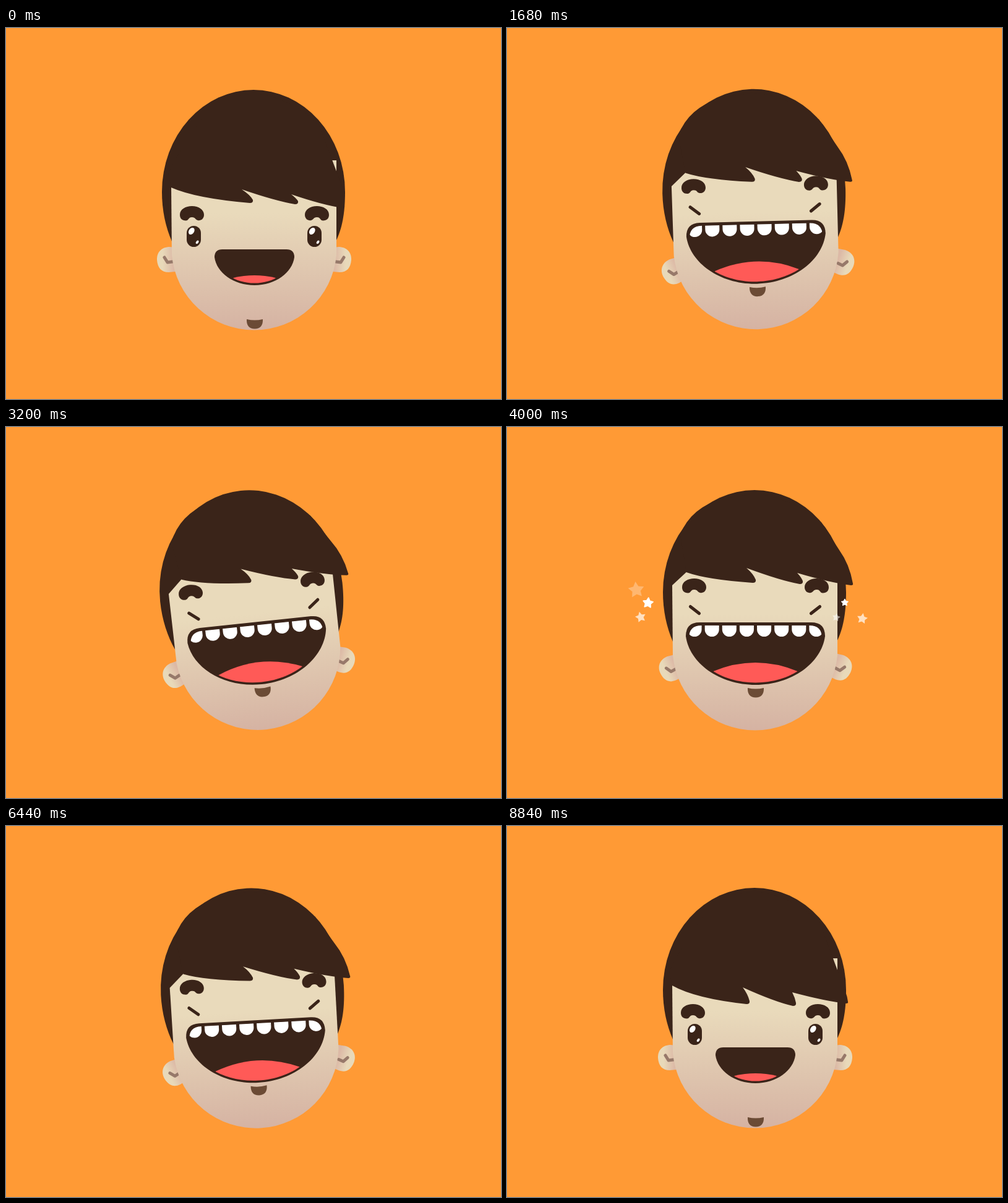
An HTML page with a canvas that plays this animation: 800 by 600 pixels, repeating every 8.88 s.

```html
<!DOCTYPE html>
<html lang="en">
<head>
<meta charset="utf-8">
<title>Laughing head</title>
<style>
html, body { margin: 0; width: 100%; height: 100%; overflow: hidden; background: #ff9a35; }
canvas { display: block; }
</style>
</head>
<body>
<canvas id="stage" width="800" height="600"></canvas>
<script>
const ctx = document.getElementById('stage').getContext('2d');
const LOOP = 8880, STEP = 40, CX = 401, DARK = '#3a2419';

// browY, browX, eyeY, eyeH, eyeAngle, mouthW, mouthTop, mouthBottom,
// tongueW, tongueSide, tongueTop, chinY, earX, earY, earAngle
const REST  = [0, 0, 337, 34, 0, 64.5, 358, 416, 34, 12, 20, 0, 0, 0, 0];
const OPEN  = [-37, 0, 302.5, 5, 0, 109.5, 321, 419, 66, 20, 47, -38, 0, 10.5, -20];
const LAUGH = [-45, 2, 294, 5, 38, 112.5, 314, 415, 68, 22, 50, -51, 2, 14, -22];

// fringe corners: left, tip, notch, tip, notch, tip, then right side, shoulder, bulge, temple
const HAIR_REST  = [267,258, 399,283, 381,261, 472,285, 461,269, 547,291, 547,266, 505,155, 305,150, 262,235];
const HAIR_DROP  = [267,258, 392,288, 381,261, 467,291, 461,269, 551,287, 547,268, 505,155, 305,150, 262,235];
const HAIR_UP    = [285,237, 398,257, 383,231, 474,257, 464,237, 551,263, 545,232, 505,152, 305,150, 262,225];
const HAIR_LAUGH = [290,233, 402,250, 387,226, 478,252, 469,234, 559,254, 537,197, 508,152, 297,128, 280,172];

const POSE = [[0, REST], [680, OPEN], [1000, LAUGH], [6700, LAUGH], [7050, OPEN], [7700, REST]];
const HAIR = [[0, HAIR_REST], [680, HAIR_UP], [1000, HAIR_LAUGH], [6700, HAIR_LAUGH], [7050, HAIR_UP],
  [7750, HAIR_DROP], [8250, HAIR_REST], [8840, HAIR_DROP]];
const TILT = [[920, [0]], [1400, [-4]], [2380, [9]], [3200, [-6]], [4000, [0]], [4550, [-3]],
  [5200, [12.8]], [6030, [-7.5]], [6820, [.8]], [7340, [0]]];

// start, duration, x from, x to, y, radius, turn
const STARS = [
  [80, 680, 273, 208, 263.5, 14, -6],
  [350, 650, 262, 217, 284.5, 10, 6],
  [130, 760, 264, 212, 307.5, 9.5, -14],
  [450, 560, 525, 557, 284, 7, 0],
  [130, 760, 527, 578, 310, 9.5, 10],
  [640, 660, 526, 578, 308, 9, 10]
];
const STAR_START = 1760, STAR_CYCLE = 1560, STAR_END = 6440;

const clamp = v => Math.max(0, Math.min(1, v));
const lerp = (a, b, u) => a + (b - a) * u;
const smooth = u => u * u * (3 - 2 * u);
const rad = d => d * Math.PI / 180;

function track(keys, t) {
  if (t <= keys[0][0]) return keys[0][1];
  for (let i = 1; i < keys.length; i++) {
    const [t1, b] = keys[i], [t0, a] = keys[i - 1];
    if (t < t1) {
      const u = smooth((t - t0) / (t1 - t0));
      return a.map((v, k) => lerp(v, b[k], u));
    }
  }
  return keys[keys.length - 1][1];
}

function fill(path, color) {
  ctx.fillStyle = color;
  ctx.fill(path);
}

function at(x, y, angle, draw, flip = 1) {
  ctx.save();
  ctx.translate(x, y);
  ctx.scale(flip, 1);
  ctx.rotate(rad(angle));
  draw();
  ctx.restore();
}

const backHair = new Path2D('M268 345C258 322 252 295 252 265A148 165 0 0 1 548 265C548 300 543 325 533 345Z');
const face = new Path2D('M267 254L310 214H534V367A133.5 133 0 0 1 268 367Z');
const ear = new Path2D('M24 -18L4 -21C-10 -21 -17.5 -12 -17 0C-16 13 -10 20 2 20L24 18Z');
const earLine = new Path2D('M-5 -4L0 4L8 3');
const brow = new Path2D('M-19.5 2C-19.5 -7 -10 -12 0 -12C11 -12 19.5 -6 19.5 2C19.5 9 14 12 9.5 11C5 10 6 6 0 6C-6 6 -5 11.500 -10 11.500C-16 11.500 -19.500 8 -19.500 2Z');
const chin = new Path2D('M389 471Q402 474 415 471C415.500 481 411 486.500 402 486.500C393 486.500 388.500 481 389 471Z');

const skin = ctx.createLinearGradient(0, 300, 0, 500);
skin.addColorStop(0, '#e9dabb');
skin.addColorStop(1, '#d4b0a1');
const earSkin = ctx.createLinearGradient(-8, 0, 10, 0);
earSkin.addColorStop(0, '#e8d9b9');
earSkin.addColorStop(1, '#dcb9a6');

function drawEars(dx, dy, angle) {
  for (const side of [-1, 1]) {
    at(CX + side * (140 - dx), 375 + dy, angle, () => {
      fill(ear, earSkin);
      ctx.strokeStyle = '#97796a';
      ctx.lineWidth = 5;
      ctx.lineCap = ctx.lineJoin = 'round';
      ctx.stroke(earLine);
    }, -side);
  }
}

function drawFringe(h) {
  const p = i => [h[2 * i], h[2 * i + 1]];
  const path = new Path2D();
  const mix = (a, b, u, v) => [lerp(a[0], b[0], u), lerp(a[1], b[1], v)];
  // a lock runs from a to a rounded tip, then back up to b
  const lock = (a, tip, b, u, v, r) => {
    const [x, y] = tip;
    path.quadraticCurveTo(...mix(a, tip, u, v), x - r, y);
    path.quadraticCurveTo(x + 1, y, x, y - r);
    path.quadraticCurveTo(...mix(b, tip, .75, .4), ...b);
  };
  path.moveTo(...p(0));
  lock(p(0), p(1), p(2), .3, .7, 5);
  lock(p(2), p(3), p(4), .6, .78, 5);
  lock(p(4), p(5), p(6), .6, .8, 3);
  path.lineTo(...p(7));
  path.quadraticCurveTo(455, 110, CX, 106);
  path.lineTo(350, 113);
  path.quadraticCurveTo(...p(8), ...p(9));
  path.closePath();
  fill(path, DARK);
}

function drawEyes(y, h, angle) {
  for (const side of [-1, 1]) {
    at(CX + side * 97.5, y, -side * angle, () => {
      const path = new Path2D();
      path.roundRect(-11.5, -h / 2, 23, h, 11.5);
      fill(path, DARK);
      if (h < 9) return;
      ctx.scale(1, h / 34);
      const shine = new Path2D();
      shine.ellipse(-3.7, -8.5, 4.2, 6, rad(35), 0, 7);
      fill(shine, '#fff');
      const dot = new Path2D();
      dot.ellipse(5.6, 9.3, 1.9, 3, rad(35), 0, 7);
      fill(dot, '#fff');
    });
  }
}

function mouthPath(x, w, top, bottom) {
  const h = bottom - top, r = h * .22, y = top + r, k = y + (h - r) * .55;
  const path = new Path2D();
  path.moveTo(x - w + r, top);
  path.lineTo(x + w - r, top);
  path.quadraticCurveTo(x + w, top, x + w, y);
  path.bezierCurveTo(x + w * .95, k, x + w * .52, bottom, x, bottom);
  path.bezierCurveTo(x - w * .52, bottom, x - w * .95, k, x - w, y);
  path.quadraticCurveTo(x - w, top, x - w + r, top);
  return path;
}

function drawMouth(w, top, bottom, tw, side, arch) {
  const x = 401.5, open = clamp((w - 64.5) / 45);
  fill(mouthPath(x, w, top, bottom), DARK);
  ctx.save();
  ctx.clip(mouthPath(x, w - 5, top + 5, bottom - 3.5));
  const tongue = new Path2D();
  tongue.moveTo(x - tw, bottom - side);
  tongue.quadraticCurveTo(x, bottom - arch, x + tw, bottom - side);
  tongue.lineTo(x + tw, bottom);
  tongue.lineTo(x - tw, bottom);
  fill(tongue, '#ff5a57');
  if (open > .05) {
    const gap = w / 4, tooth = 23 * open, tall = 18.5 * open;
    for (let i = 0; i < 8; i++) {
      const path = new Path2D();
      const r = Math.min(tooth / 2, tall);
      path.roundRect(x + (i - 3.5) * gap - tooth / 2, top + 4.5, tooth, tall, [0, 0, r, r]);
      fill(path, '#fff');
    }
  }
  ctx.restore();
}

function drawStar(x, y, r, turn, alpha) {
  at(x, y, turn, () => {
    const path = new Path2D(), size = r * .88;
    for (let i = 0; i < 10; i++) {
      const a = i * Math.PI / 5 - Math.PI / 2, d = i % 2 ? size * .52 : size;
      path.lineTo(Math.cos(a) * d, Math.sin(a) * d);
    }
    path.closePath();
    const grow = new Path2D(path);
    ctx.globalAlpha = alpha;
    ctx.lineJoin = 'round';
    ctx.lineWidth = r * .2;
    ctx.strokeStyle = '#fff';
    // fade fill and outline as one shape
    if (alpha < 1) {
      ctx.lineWidth = 0.01;
      ctx.scale(1.1, 1.1);
    }
    fill(grow, '#fff');
    if (alpha === 1) ctx.stroke(path);
  });
}

function drawStars(t) {
  if (t < STAR_START || t >= STAR_END) return;
  const c = (t - STAR_START) % STAR_CYCLE;
  for (const [start, span, x0, x1, y, r, turn] of STARS) {
    const u = (c - start) / span;
    if (u <= 0 || u >= 1) continue;
    const e = 1 - (1 - u) ** 2;
    const alpha = Math.min(clamp(u / .11), clamp((1 - u) / .4));
    drawStar(lerp(x0, x1, e), y, r * lerp(.75, 1, e), turn, alpha);
  }
}

function tilted(angle, bob, draw) {
  at(CX, 300 + bob, angle, () => {
    ctx.translate(-CX, -300);
    draw();
  });
}

function render(t) {
  const [browY, browX, eyeY, eyeH, eyeA, mw, mt, mb, tw, ts, ta, chinY, earX, earY, earA] = track(POSE, t);
  const tilt = track(TILT, t)[0], lag = track(TILT, t - 120)[0];
  const shake = clamp((t - 920) / 300) * clamp((7340 - t) / 300);
  const bob = 2 * shake * Math.cos(2 * Math.PI * (t - 4000) / 880);

  ctx.fillStyle = '#ff9a35';
  ctx.fillRect(0, 0, 800, 600);
  tilted(lag, bob, () => drawEars(earX, earY, earA));
  tilted(tilt, bob, () => {
    fill(backHair, DARK);
    fill(face, skin);
    drawFringe(track(HAIR, t));
    for (const side of [-1, 1])
      at(CX + side * (101 - browX) + .5, 300 + browY, 0, () => fill(brow, DARK), -side);
    drawEyes(eyeY, eyeH, eyeA);
    drawMouth(mw, mt, mb, tw, ts, ta);
    at(0, chinY, 0, () => fill(chin, '#6b4b35'));
  });
  drawStars(t);
}

const begin = performance.now();
function tick() {
  const t = (performance.now() - begin) % LOOP;
  render(Math.floor(t / STEP) * STEP);
  requestAnimationFrame(tick);
}
tick();
</script>
</body>
</html>
```
